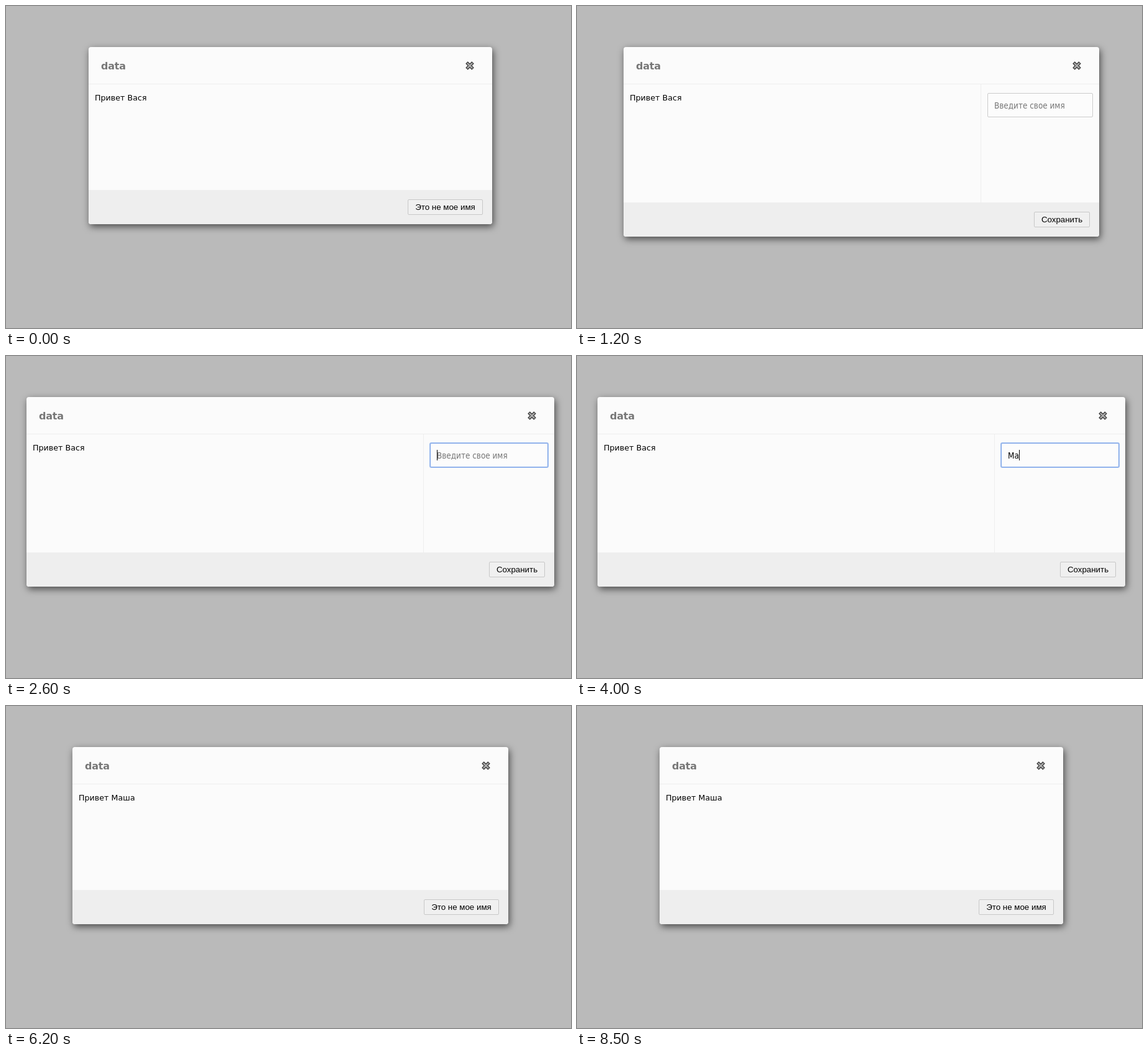
These frames come from a looping animation (910x518 px, 9800 ms). An HTML page:

```html
<!DOCTYPE html>
<html lang="ru">
<head>
<meta charset="utf-8">
<title>data</title>
<style>
html, body { margin: 0; width: 100%; height: 100%; overflow: hidden; background: #bababa; }
body { position: relative; }
body * { box-sizing: border-box; }
.modal, .modal > *, .field * { position: absolute; white-space: pre; }
.modal {
  top: 66px; overflow: visible; border-radius: 4px; background: #fbfbfb;
  box-shadow: 2px 4px 12px rgba(0, 0, 0, .6);
}
.title {
  left: 20px; top: 21px; color: #777; letter-spacing: -.2px;
  font: bold 16px/20px "DejaVu Sans", sans-serif;
}
.close { right: 28px; top: 22px; width: 16px; height: 16px; }
.rule { left: 0; right: 0; top: 59px; height: 1px; background: #eee; }
.hello { left: 10px; top: 70px; font: 12.7px/16px "DejaVu Sans", sans-serif; }
.hello span { display: inline-block; height: 16px; }
.hello .marked { color: #fff; background: #39f; }
.side { right: 0; top: 60px; height: 190px; border-left: 1px solid #eee; }
.field {
  position: absolute; left: 10px; right: 10px; top: 14px; height: 39px;
  border: 1px solid #ccc; border-radius: 2px; background: #fcfcfc;
}
.field.focus { border-color: #86aae8; box-shadow: 0 0 0 1px #9dbcf0; }
.field .line {
  left: 10px; top: 11px; font: 13.4px/17px "DejaVu Sans Condensed", "DejaVu Sans", sans-serif;
  font-stretch: condensed;
}
.line span { position: static; }
.line .hint { color: #777; }
.line .caret { margin-top: -1px; width: 1px; height: 17px; background: #000; }
.foot { left: 0; right: 0; bottom: 0; height: 55px; background: #eee; border-radius: 0 0 4px 4px; }
.button {
  right: 15px; bottom: 15px; height: 25px; text-align: center;
  border: 1px solid #c8c8c8; border-radius: 2px; background: #f0f0f0;
  font: 13.333px/23px "Liberation Sans", Arial, sans-serif;
}
</style>
</head>
<body>
<div class="modal">
  <div class="title">data</div>
  <svg class="close" viewBox="-8 -8 16 16" fill="none">
    <path d="M-5-5L5 5M5-5L-5 5" stroke="#333" stroke-width="5"/>
    <path d="M-4.2-4.2L4.2 4.2M4.2-4.2L-4.2 4.2" stroke="#aaa" stroke-width="2.6"/>
  </svg>
  <div class="rule"></div>
  <div class="hello">Привет <span class="marked"></span><span class="name"></span></div>
  <div class="side"><div class="field"><div class="line"><span class="typed"></span><i class="caret"></i><span class="hint">Введите свое имя</span></div></div></div>
  <div class="foot"></div>
  <div class="button"></div>
</div>
<script>
const LOOP = 9800, TICK = 100, CENTER = 458, NARROW = 650, WIDE = 850;
const OPEN = 1100, FOCUS = 2600, CLOSE = 6067, GLIDE = 300;
const NAME = 'Маша';
const KEYS = [3700, 4000, 4700, 5000];
const BLINKS = [[3100, 3600], [4500, 4700], [5500, 6000]];

const $ = name => document.querySelector('.' + name);
const [modal, hello, marked, side, field, typed, caret, hint, button] =
  ['modal', 'name', 'marked', 'side', 'field', 'typed', 'caret', 'hint', 'button'].map($);
const show = (el, on) => { el.style.display = on ? '' : 'none'; };

// cubic-bezier(.25, .1, .25, 1)
function ease(x) {
  if (x <= 0) return 0;
  if (x >= 1) return 1;
  let lo = 0, hi = 1, s;
  for (let i = 0; i < 24; i++) {
    s = (lo + hi) / 2;
    if (.75 * s * (1 - s) + s ** 3 < x) lo = s; else hi = s;
  }
  return .3 * s * (1 - s) ** 2 + 3 * s * s * (1 - s) + s ** 3;
}

function render(t) {
  const editing = t >= OPEN && t < CLOSE;
  const spread = ease((t - OPEN) / GLIDE) - ease((t - CLOSE) / GLIDE);
  const width = 2 * Math.round((NARROW + (WIDE - NARROW) * spread) / 2);
  modal.style.left = CENTER - width / 2 + 'px';
  modal.style.width = width + 'px';
  modal.style.height = (editing ? 305 : 285) + 'px';

  const name = t < CLOSE ? 'Вася' : NAME;
  const picked = t < 7700 || t >= 8500 ? 0 : t < 7800 ? 2 : 4;
  marked.textContent = name.slice(0, picked);
  hello.textContent = name.slice(picked);

  show(side, editing);
  side.style.width = Math.round(width * .235 + 11.25) + 'px';
  const count = KEYS.filter(k => t >= k).length;
  const focused = t >= FOCUS;
  field.classList.toggle('focus', focused);
  typed.textContent = NAME.slice(0, count);
  show(hint, !count);
  show(caret, focused && !BLINKS.some(([off, on]) => t >= off && t < on));

  button.textContent = editing ? 'Сохранить' : 'Это не мое имя';
  button.style.width = (editing ? 90 : 121) + 'px';
}

function frame() {
  const t = performance.now() % LOOP;
  render(Math.floor(t / TICK) * TICK);
  requestAnimationFrame(frame);
}
frame();
</script>
</body>
</html>
```
